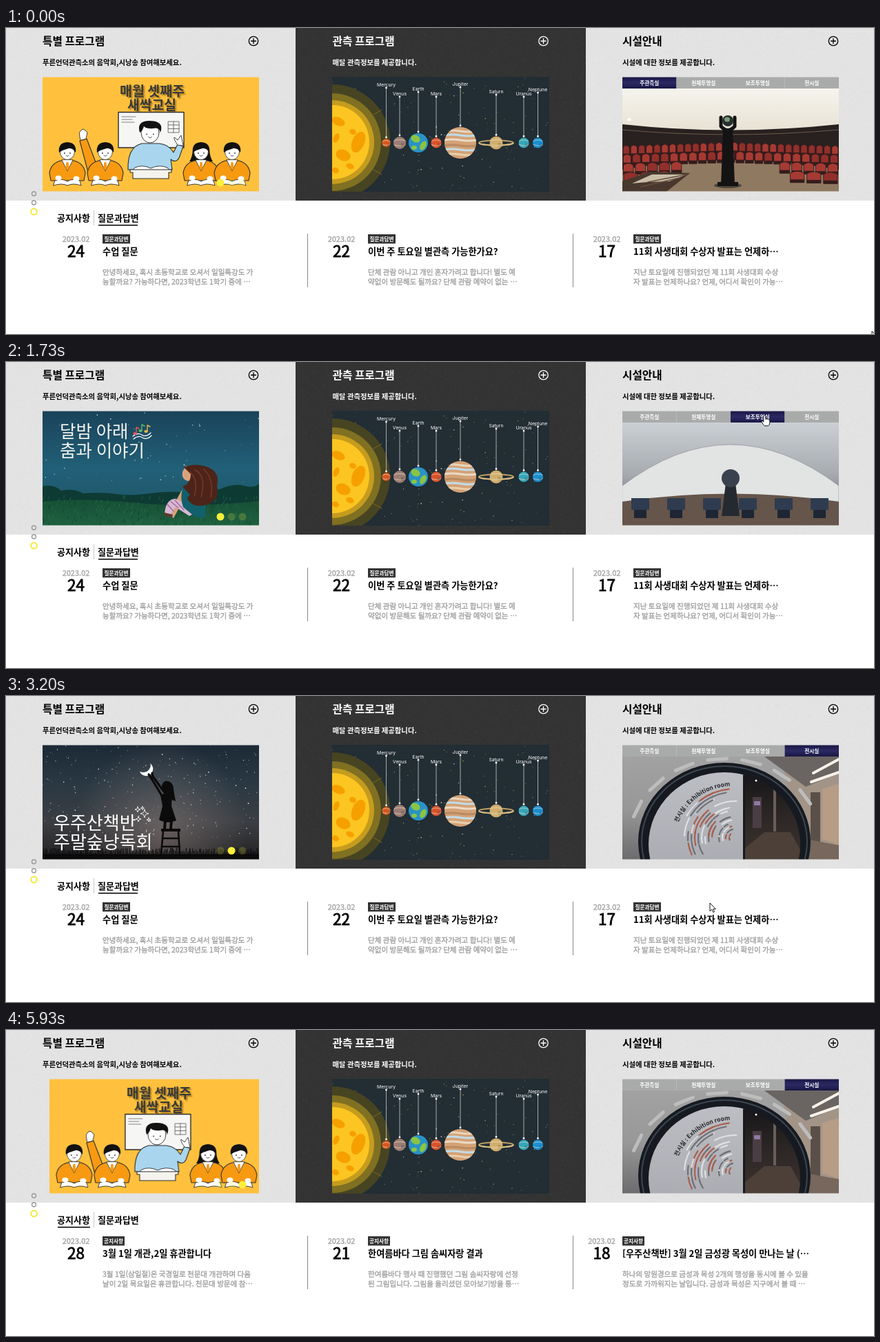
Recreate the animation shown at these times as an HTML page with a canvas. Size 1259 by 445 pixels, loop 5990 ms.

```html
<!DOCTYPE html>
<html lang="ko">
<head>
<meta charset="utf-8">
<title>천문대 안내</title>
<style>
html, body { margin: 0; width: 100%; height: 100%; overflow: hidden; background: #fff; }
canvas { display: block; }
</style>
</head>
<body>
<canvas id="stage" width="1259" height="445"></canvas>
<script>
const LOOP = 5990, TICK = 1000 / 15;
const SANS = '"Noto Sans CJK KR", "Noto Sans CJK JP", "Noto Sans", sans-serif';
const stage = document.getElementById('stage').getContext('2d');
let g = stage;

// Drawing helpers
function rect(c, x, y, w, h) { g.fillStyle = c; g.fillRect(x, y, w, h); }
function disc(c, x, y, rx, ry = rx, turn = 0) {
  g.fillStyle = c; g.beginPath(); g.ellipse(x, y, rx, ry, turn, 0, 7); g.fill();
}
function ring(c, w, x, y, rx, ry = rx, a = 0, b = 7) {
  g.strokeStyle = c; g.lineWidth = w;
  g.beginPath(); g.ellipse(x, y, rx, ry, 0, a, b); g.stroke();
}
function shape(d, fill, stroke, w = 1) {
  const p = new Path2D(d);
  if (fill) { g.fillStyle = fill; g.fill(p); }
  if (stroke) { g.strokeStyle = stroke; g.lineWidth = w; g.stroke(p); }
}
// A thin outline thickens weight 500, which may have no face of its own
function text(s, x, y, size, weight, color, align = 'left', family = SANS) {
  g.font = `${weight} ${size}px ${family}`;
  g.fillStyle = g.strokeStyle = color; g.textAlign = align;
  g.fillText(s, x, y + size * 0.37);
  if (weight === 500) {
    g.lineWidth = size * 0.035;
    g.strokeText(s, x, y + size * 0.37);
  }
}
function fade(y0, y1, ...colors) {
  const f = g.createLinearGradient(0, y0, 0, y1);
  colors.forEach((c, i) => f.addColorStop(i / (colors.length - 1), c));
  return f;
}
function seeded(seed) {
  return () => (seed = (seed * 16807) % 2147483647) / 2147483647;
}
function at(x, y, draw) { g.save(); g.translate(x, y); draw(); g.restore(); }

// Paints once, in stage coordinates, into a picture of its own
function layer(x, y, w, h, draw) {
  const c = document.createElement('canvas');
  c.width = w; c.height = h;
  g = c.getContext('2d');
  g.translate(-x, -y);
  g.lineJoin = g.lineCap = 'round';
  draw();
  g = stage;
  return c;
}
function stars(seed, n, x, y, w, h, color) {
  const rnd = seeded(seed);
  for (let i = 0; i < n; i++) {
    g.globalAlpha = 0.3 + 0.7 * rnd();
    disc(color, x + w * rnd(), y + h * rnd(), 0.3 + 0.6 * rnd());
  }
  g.globalAlpha = 1;
}

// Left slides
const INK = '#2d2d2d';
function face(x, y, r) {
  disc(INK, x - r * 0.4, y + r * 0.2, 0.9);
  disc(INK, x + r * 0.4, y + r * 0.2, 0.9);
  ring(INK, 0.8, x, y + r * 0.45, r * 0.22, r * 0.18, 0.3, 2.8);
}
function pupil(x, girl) {
  at(x, 179, () => {
    if (girl) shape('M-12 -2Q-13 10 -17 15H17Q13 10 12 -2Z', '#111');
    shape('M-26 32Q-24 18 -10 14H10Q24 18 26 32L24 43H-24Z', '#f79a12', INK, 1.1);
    shape('M-8 13L0 29L8 13Z', '#fff', INK, 0.8);
    shape('M-1.5 16H1.5L2.5 24L0 28L-2.5 24Z', '#f79a12');
    disc('#fff', 0, 1, 10.5, 11.5);
    ring(INK, 0.8, 0, 1, 10.5, 11.5);
    shape('M-12 2Q-14 -12 0 -13Q14 -12 12 2Q8 -5 2 -4Q-6 -2 -12 2Z', '#111');
    face(0, 1, 10);
    shape('M-18 43Q-8 39 0 44Q8 39 18 43L20 50Q8 46 0 50Q-8 46 -20 50Z', '#fff', INK, 0.9);
    disc('#fff', -13, 39, 4.5, 3.5);
    disc('#fff', 13, 40, 4.5, 3.5);
  });
}
function classSlide() {
  rect('#ffc13d', 53, 71, 314, 167);
  g.shadowColor = 'rgba(70,50,0,.5)'; g.shadowOffsetX = g.shadowOffsetY = 2; g.shadowBlur = 2;
  text('매월 셋째주', 212, 92, 19.5, 700, '#383838', 'center');
  text('새싹교실', 211.5, 112, 19.3, 700, '#383838', 'center');
  g.shadowColor = 'transparent';
  shape('M163 122.5H258V174H163Z', '#f6f6f4', INK, 1.4);
  shape('M168 129H188M168 133H183M168 137H186', null, '#666', 0.8);
  shape('M235.5 136H251V152H235.5ZM243 136V152M235.5 141H251M235.5 146.5H251', null, '#555', 0.8);
  shape('M177 206Q176 173 197 168H222Q236 169 243 181L249 169L257 172L251 189Q246 197 239 191L241 206Z', '#a9d6ee', INK, 1.1);
  shape('M249 170Q243 162 244 159L249 163L254 156L257 171Z', '#fff', INK, 0.9);
  disc('#fff', 209, 152, 13, 15);
  ring(INK, 0.9, 209, 152, 13, 15);
  shape('M194 152Q189 135 208 135Q230 135 224 152Q222 144 214 146Q204 147 200 143Q198 150 194 152Z', '#111');
  face(209, 152, 12);
  shape('M187 203Q198 198 210 204Q222 198 234 203L237 207H184Z', '#fff', INK, 0.9);
  shape('M180 206H240V210H236V219H184V210H180Z', '#f5f3ee', INK, 1.1);
  shape('M121 217L107 164L117 161L130 195Z', '#f79a12', INK, 1.1);
  shape('M108 163Q105 151 108 150L111 147L114 148L118 152L116 161Z', '#fff', INK, 0.9);
  pupil(89); pupil(144); pupil(283, true); pupil(328);
}
function nightSlide() {
  rect(fade(71, 238, '#1a425a', '#216078', '#1e5361'), 53, 71, 314, 167);
  stars(9, 75, 53, 71, 314, 115, '#d8e6dc');
  shape('M53 181Q68 177 80 187Q98 183 112 191Q140 189 160 192T210 191T258 190T310 185Q330 176 345 180T367 177V238H53Z', '#0d3b34');
  shape('M53 203Q110 197 190 205T367 202V238H53Z', fade(200, 238, '#164f35', '#1f6140'));
  const rnd = seeded(44);
  for (let i = 0; i < 260; i++) {
    const x = 53 + 314 * rnd(), y = 198 + 40 * rnd();
    shape(`M${x} ${y}l1 -4`, null, i % 2 ? '#28704a' : '#123f30', 0.7);
  }
  text('달밤 아래', 78, 101, 25.5, 300, '#f4f4ee');
  text('춤과 이야기', 78, 129, 25.5, 300, '#f4f4ee');
  shape('M184 108Q191 102 197 106T210 103M185 112Q192 106 198 110T211 107', null, '#fff', 1.2);
  [['#e2575a', 187, 104], ['#63b961', 195, 100], ['#e7b94a', 203, 101]].forEach(([c, x, y]) => {
    disc(c, x, y, 2.6, 2);
    shape(`M${x + 2} ${y}V${y - 9}L${x + 6} ${y - 7}`, null, c, 1.4);
  });
  shape('M260 180Q246 197 239 224L243 227L255 205Z', '#d9a27b');
  shape('M246 199Q232 199 230 220L239 222L246 211L266 224L279 216Z', '#d7b8d2');
  shape('M234 207L243 217M239 203L250 212M245 201L258 215', null, '#a9679c', 1.5);
  shape('M261 176Q250 191 257 211L275 226H289L291 192Q283 174 261 176Z', '#12606b');
  shape('M230 219L242 222L241 226L228 223Z', '#5a3b33');
  disc('#d9a27b', 264, 163, 8.5, 10);
  disc('#d9a27b', 261, 154, 2, 3, 0.5);
  shape('M258 153Q274 146 293 153Q311 160 306 181Q311 199 293 207Q274 213 266 203Q260 199 267 193L256 181Q268 177 268 163Z', '#4d2419');
  shape('M274 157Q291 165 283 196M287 156Q302 170 297 196M267 160Q280 173 273 195', null, '#743a25', 1.5);
}
function moonSlide() {
  rect(fade(71, 238, '#1c2a36', '#2a3843', '#3b3e43', '#242224'), 53, 71, 314, 167);
  const glow = g.createRadialGradient(225, 195, 5, 225, 190, 125);
  glow.addColorStop(0, 'rgba(145,130,125,.5)');
  glow.addColorStop(1, 'rgba(145,130,125,0)');
  rect(glow, 53, 71, 314, 167);
  stars(23, 240, 53, 71, 314, 135, '#e6edf0');
  const black = '#0c0b0c';
  const rnd = seeded(17);
  rect(black, 53, 230, 314, 8);
  for (let x = 53; x < 367; x += 1.2) {
    shape(`M${x} 232l${2 * rnd() - 1} ${-3 - 8 * rnd()}`, null, black, 0.8);
  }
  shape('M209 98A10 10 0 1 1 194 110Q204 113 208 106Q211 102 209 98Z', '#fff');
  shape('M226 145L211 120M234 146L213 117M211 120L207 114M213 117L212 112', null, black, 3.2);
  disc(black, 233, 132, 7, 8.5);
  shape('M231 124Q243 123 243 136L246 153L234 148L228 134Z', black);
  shape('M224 144Q232 139 241 147L240 160L247 181Q234 187 222 180L227 160Z', black);
  shape('M231 180L230 193M240 181L239 194', null, black, 4);
  rect(black, 225, 193, 28, 4);
  shape('M228 196L225 230M250 196L252 230M227 207H251M226 219H252', null, black, 2.6);
  [[191, 165, 4], [201, 171, 6], [192, 179, 4], [207, 180, 3], [198, 163, 2.5]].forEach(([x, y, r]) => {
    const q = r / 4;
    shape(`M${x} ${y - r}L${x + q} ${y - q}L${x + r} ${y}L${x + q} ${y + q}L${x} ${y + r}L${x - q} ${y + q}L${x - r} ${y}L${x - q} ${y - q}Z`, null, '#fff', 0.8);
  });
  text('우주산책반', 69, 184, 26, 300, '#fff');
  text('주말숲낭독회', 69, 212, 26, 300, '#fff');
}

// Middle picture
function solarSystem() {
  rect('#222d34', 473, 71, 315, 167);
  stars(71, 170, 473, 71, 315, 167, '#8a8f45');
  stars(5, 28, 540, 71, 248, 167, '#fff');
  [['#474422', 84], ['#807022', 71], ['#c59c1e', 61], ['#fcc521', 54]].forEach(([c, r]) => disc(c, 473, 166, r));
  [[482, 136, 10, 6], [503, 151, 5, 4], [511, 166, 9, 16], [489, 185, 11, 8], [479, 160, 4, 7], [478, 207, 5, 4], [499, 201, 6, 4]]
    .forEach(([x, y, a, b]) => disc('#f6a000', x, y, a, b, 0.4));
  shape('M543 166H558M533 126L545 119M533 206L545 213', null, '#7b6a22', 1);
  const planets = [
    ['Mercury', 551.5, 82, 6, '#d6561f'], ['Venus', 571, 95, 9, '#9c7d74'],
    ['Earth', 598, 88, 14, '#2a92c7'], ['Mars', 624, 95, 7.5, '#d7522c'],
    ['Jupiter', 659, 81, 23, '#d4a276'], ['Saturn', 711, 92, 9.5, '#d0ae6e'],
    ['Uranus', 751, 95, 7.5, '#36a6b9'], ['Neptune', 771.5, 89, 7.5, '#198fd2']
  ];
  for (const [name, x, y, r, c] of planets) {
    text(name, x, y, 6.8, 400, '#fff', 'center', 'Inter, sans-serif');
    shape(`M${x} ${y + 6}V${165 - r}`, null, '#c9cdcf', 0.8);
    disc('#fff', x, y + 5, 1.4);
    disc('#fff', x, 165 - r, 1.4);
    if (name === 'Saturn') ring('#b59a62', 2, x, 167, 25, 3.5);
    disc(c, x, 167, r);
    g.save();
    g.beginPath(); g.arc(x, 167, r, 0, 7); g.clip();
    if (name === 'Earth') {
      disc('#8ac541', x - 4, 161, 7, 5, 0.5);
      disc('#8ac541', x + 7, 171, 4, 7, 0.5);
      disc('#8ac541', x - 6, 174, 4, 3);
    } else if (name === 'Jupiter') {
      [[150, '#ead5bb'], [156, '#bfdcea'], [163, '#eadac7'], [171, '#b98a62'], [177, '#c4dce6'], [184, '#e8cfad']]
        .forEach(([yy, k]) => shape(`M${x - 24} ${yy}q12 -2 24 0t24 0`, null, k, 3.2));
    } else {
      shape(`M${x - r} ${167 - r / 3}q${r} -3 ${2 * r} 0M${x - r} ${167 + r / 3}q${r} 3 ${2 * r} 0`, null, 'rgba(255,235,210,.4)', 1.6);
      disc('rgba(0,0,0,.18)', x + r * 0.5, 170, r * 0.3);
    }
    g.restore();
    if (name === 'Saturn') ring('#d8bd83', 2, x, 167, 25, 3.5, 0.2, 2.94);
  }
}

// Room pictures
function seatsRoom() {
  rect(fade(88, 152, '#f6f4ee', '#e7e1d2'), 894, 88, 314, 150);
  shape('M894 140Q1050 157 1208 140V210H894Z', '#292120');
  shape('M894 148Q1050 162 1208 148', null, '#6c5a4c', 1);
  shape('M894 238V206Q1050 178 1208 206V238Z', '#8f7961');
  const rnd = seeded(12);
  for (let row = 0; row < 4; row++) {
    const n = 28 - row * 5, w = 314 / n;
    for (let i = 0; i < n; i++) {
      const x = 894 + (i + 0.5) * w, side = Math.abs(x - 1048) / 157;
      if (row > 1 && side < 0.25 + row * 0.11) continue;
      const y = 172 + row * 13 + side * 5;
      shape(`M${x - w * 0.42} ${y + 10}V${y - 3}Q${x} ${y - 9} ${x + w * 0.42} ${y - 3}V${y + 10}Z`, rnd() > 0.5 ? '#a63a33' : '#912f2b', '#351b1a', 0.9);
      rect('#351d1b', x - w * 0.42, y + 6, w * 0.84, 5);
    }
  }
  shape('M894 223L933 209L992 211L958 238H894Z', '#49382d');
  shape('M908 226L937 213L987 213L962 223L931 224Z', '#c9bda8');
  shape('M931 224L987 213M921 231L976 218', null, '#65503e', 1.5);
  const dark = '#141314';
  disc('#51463b', 1047, 229, 20, 4);
  shape('M1040 148H1054L1057 228H1037Z', dark);
  rect(dark, 1032, 224, 30, 6);
  shape('M1037 130V143Q1047 154 1057 143V130', null, dark, 5);
  disc('#26302b', 1047, 135, 8, 8);
  disc('#7c9a7a', 1046, 133, 4, 3.5);
  disc('#fff', 904, 133, 3, 2);
}
function scopeRoom() {
  rect(fade(88, 210, '#ddd6ca', '#f0eeea', '#d5d3ce'), 894, 88, 314, 150);
  shape('M894 88H1208V104Q1052 82 894 112Z', '#c5bdb0');
  shape('M894 129Q1040 105 1208 134', null, '#bdb6aa', 1);
  shape('M894 205Q950 184 1045 181Q1150 180 1208 216V238H894Z', '#755c4e');
  for (let i = 0; i < 13; i++) shape(`M${1048 + (i - 6) * 15} 182L${1048 + (i - 6) * 46} 238`, null, '#876c5b', 0.7);
  [[958, 145], [1000, 140], [1041, 137], [1088, 135], [1129, 143]].forEach(([x, y], i) => {
    shape(`M${x - 9} ${y - 7}L${x + 9} ${y - 9}V${y + 8}L${x - 8} ${y + 9}Z`, '#232a35');
    disc(i % 2 ? '#5b87ad' : '#8b8b88', x, y, 5);
  });
  [[912, 184], [940, 178], [980, 166], [1018, 162], [1112, 168]].forEach(([x, y]) =>
    shape(`M${x - 10} ${y - 5}L${x + 10} ${y - 8}V${y + 6}L${x - 10} ${y + 9}Z`, '#f4f3f0', '#aaa69e', 0.8));
  disc('#b62f31', 1123, 156, 4, 5);
  rect('#3a3d40', 1121, 160, 3, 29);
  disc('#5e6f81', 1063, 222, 27, 13);
  disc('#8ca3b8', 1063, 216, 22, 9);
  shape('M1055 165H1075L1082 216Q1063 225 1046 216Z', '#7797b5');
  shape('M1045 157L1081 148L1087 170L1052 181Z', '#a8c3da');
  shape('M1059 109L1086 112L1077 168L1054 164Z', '#e9edf0', '#a9b0b5', 0.8);
  shape('M1060 122L1084 126L1081 145L1058 142Z', '#8badc9');
  disc('#1b1c20', 1072, 109, 14, 9, 0.1);
  rect('#40515f', 1052, 178, 15, 17);
  shape('M1147 238V195L1208 180M1147 207L1208 194M1147 219L1208 209M1160 193V238M1178 188V238M1196 184V238', null, '#777a7d', 2);
}
function domeRoom() {
  rect(fade(88, 238, '#cbd0d5', '#a7abb0', '#555a63'), 894, 88, 314, 150);
  shape('M894 180Q1050 60 1208 180V205H894Z', '#e2e3e3', '#9da2a8', 1);
  shape('M894 203Q1050 180 1208 203V238H894Z', '#66554a');
  for (let i = 0; i < 6; i++) {
    const x = 920 + i * 52;
    rect('#2f3c50', x - 13, 198, 26, 17);
    rect('#1e2634', x - 9, 215, 18, 12);
  }
  shape('M1044 176H1058L1064 224H1038Z', '#252a31');
  disc('#39424e', 1051, 169, 13);
}
function arcText(s, cx, cy, r, from, size) {
  g.font = `700 ${size}px ${SANS}`;
  g.textAlign = 'center'; g.fillStyle = '#26262a';
  let a = from;
  for (const ch of s) {
    const half = g.measureText(ch).width / r / 2;
    a += half;
    at(cx + r * Math.cos(a), cy + r * Math.sin(a), () => {
      g.rotate(a + Math.PI / 2);
      g.fillText(ch, 0, 0);
    });
    a += half;
  }
}
function exhibitRoom() {
  rect(fade(88, 238, '#a2a2a2', '#989898', '#6c6c6e'), 894, 88, 314, 150);
  shape('M1125 88H1208V238H1150Z', '#a39488');
  shape('M1100 88H1208V112L1160 132Z', '#6a6562');
  shape('M1171 112L1208 92M1168 125L1208 111', null, '#f7f2ea', 4);
  shape('M1167 140H1181V213H1167Z', '#5b4f49');
  shape('M1184 135L1208 128V216L1184 208Z', '#b79c86');
  shape('M1160 208L1208 217V238H1160Z', '#77675d');
  for (let i = 0; i < 7; i++) {
    const a = 3.45 + i * 0.36;
    shape(`M${1043 + 139 * Math.cos(a)} ${212 + 121 * Math.sin(a)}L${1043 + 139 * Math.cos(a + 0.2)} ${212 + 121 * Math.sin(a + 0.2)}`, null, '#bdbdbd', 5);
  }
  disc('#161a20', 1042, 212, 125, 115);
  ring('#3c4650', 2, 1042, 212, 120, 110);
  g.save();
  g.beginPath(); g.ellipse(1042, 216, 110, 105, 0, 0, 7); g.clip();
  rect(fade(110, 238, '#bcbec3', '#abadb3'), 925, 100, 146, 138);
  rect(fade(110, 238, '#171517', '#2c2726', '#3c322d'), 1070, 100, 90, 138);
  shape('M1071 222L1100 198H1138L1160 238H1071Z', '#4c4039');
  rect('#4a3d44', 1083, 147, 13, 45);
  rect('#6b5d59', 1113, 135, 4, 62);
  rect('#8f78a2', 1085, 153, 9, 6);
  [[1088, 123], [1106, 119], [1125, 130]].forEach(([x, y]) => disc('#fff', x, y, 1.5));
  const rnd = seeded(31);
  for (let r = 9; r < 80; r += 5) {
    for (let k = 0; k < 4; k++) {
      const a = 2.6 + rnd() * 1.7, c = rnd() > 0.73 ? '#a8604f' : rnd() > 0.5 ? '#6f7077' : '#dedfe2';
      ring(c, 2.2, 1058, 206, r, r * 0.9, a, a + 0.2 + rnd() * 0.4);
    }
  }
  rect('#18191d', 1069, 100, 3, 138);
  g.restore();
  arcText('전시실 : Exhibition room', 1053, 215, 84, 3.52, 8.5);
}

const slides = [nightSlide, moonSlide, classSlide].map(d => layer(53, 71, 314, 167, d));
const rooms = [seatsRoom, scopeRoom, domeRoom, exhibitRoom].map(d => layer(894, 88, 314, 150, d));
const planetPicture = layer(473, 71, 315, 167, solarSystem);

// Everything that stays
const page = layer(0, 0, 1259, 445, () => {
  rect('#fff', 0, 0, 1259, 445);
  rect('#e3e3e3', 0, 0, 1259, 251);
  rect('#333', 420, 0, 421, 251);
  const rnd = seeded(7);
  for (let i = 0; i < 26000; i++) {
    rect(i % 2 ? 'rgba(255,255,255,.025)' : 'rgba(0,0,0,.02)', Math.floor(1259 * rnd()), Math.floor(251 * rnd()), 2, 1);
  }
  [['특별 프로그램', '푸른언덕관측소의 음악회,시낭송 참여해보세요.', '#000'],
   ['관측 프로그램', '매달 관측정보를 제공합니다.', '#fff'],
   ['시설안내', '시설에 대한 정보를 제공합니다.', '#000']].forEach(([head, sub, c], i) => {
    const x = 53 + i * 420.5;
    text(head, x, 19, 15.7, 700, c);
    text(sub, x, 50.5, 10.35, 700, c);
    ring(c, 1.3, x + 306, 19, 6.7);
    shape(`M${x + 302.5} 19h7m-3.5 -3.5v7`, null, c, 1.3);
  });
  g.drawImage(planetPicture, 473, 71);
  ring('#999', 1.4, 40.5, 241, 3);
  ring('#999', 1.4, 40.5, 254, 3);
  ring('#f3e93a', 2, 40.5, 267, 4.4);
  rect('#c8c8c8', 127, 265, 1, 22);
  rect('#8a8a8a', 437, 299, 1, 78);
  rect('#8a8a8a', 822, 299, 1, 78);
});

const TABS = ['주관측실', '천체투영실', '보조투영실', '전시실'];
const BOARDS = [
  { name: '공지사항', x: 74, w: 47, badge: 32, cols: [140, 525, 894], days: [101.5, 486.5, 864], posts: [
    ['28', '3월 1일 개관,2일 휴관합니다', '3월 1일(삼일절)은 국경일로 천문대 개관하며 다음', '날이 2일 목요일은 휴관합니다. 천문대 방문에 참⋯'],
    ['21', '한여름바다 그림 솜씨자랑 결과', '한여름바다 행사 때 진행했던 그림 솜씨자랑에 선정', '된 그림입니다. 그림을 올리셨던 모아보기방을 통⋯'],
    ['18', '[우주산책반] 3월 2일 금성광 목성이 만나는 날 (⋯', '하나의 망원경으로 금성과 목성 2개의 행성을 동시에 볼 수 있을', '정도로 가까워지는 날입니다. 금성과 목성은 지구에서 볼 때 ⋯']] },
  { name: '질문과답변', x: 133, w: 57, badge: 40, cols: [140, 525, 910], days: [101.5, 486.5, 871.5], posts: [
    ['24', '수업 질문', '안녕하세요, 혹시 초등학교로 오셔서 일일특강도 가', '능할까요? 가능하다면, 2023학년도 1학기 중에 ⋯'],
    ['22', '이번 주 토요일 별관측 가능한가요?', '단체 관람 아니고 개인 혼자가려고 합니다! 별도 예', '약없이 방문해도 될까요? 단체 관람 예약이 없는 ⋯'],
    ['17', '11회 사생대회 수상자 발표는 언제하⋯', '지난 토요일에 진행되었던 제 11회 사생대회 수상', '자 발표는 언제하나요? 언제, 어디서 확인이 가능⋯']] }
];

// Pointer stops: time, x, y
const ROUTE = [
  [0, 1256, 441], [200, 1105, 250], [400, 900, 70], [467, 888, 60], [600, 897, 62],
  [867, 1020, 79], [1067, 1020, 79], [1133, 1027, 81], [1267, 1027, 81], [1600, 1095, 78],
  [1800, 1103, 77], [2133, 1159, 75], [2733, 1159, 75], [2933, 1112, 175], [3200, 1021, 301],
  [3533, 926, 352], [4000, 100, 281], [4267, 100, 281], [4400, 152, 281], [4533, 152, 281],
  [4600, 137, 281], [4867, 100, 282], [5133, 100, 282], [5400, 150, 460], [LOOP, 150, 460]
];
const ARROW = 'M0 0V12L2.8 9.4L4.8 13.6L6.6 12.8L4.7 8.8H8.4Z';
const HAND = 'M-1.5 1Q0 -1 1.5 1V6Q3 4.8 4 6Q5.4 5.4 6 6.8Q7.5 6.5 7.5 8V11Q7 15 5 15.5H0Q-2 14 -4.5 9.5Q-4.5 8 -3 8.3L-1.5 9.8Z';

function pointer(t) {
  const i = Math.max(1, ROUTE.findIndex(s => s[0] > t));
  const [t0, x0, y0] = ROUTE[i - 1], [t1, x1, y1] = ROUTE[i];
  const p = (t - t0) / (t1 - t0);
  return [x0 + (x1 - x0) * p, y0 + (y1 - y0) * p];
}

// The CSS "ease" curve, solved by bisection
function ease(x) {
  if (x <= 0 || x >= 1) return x <= 0 ? 0 : 1;
  const curve = (s, a, b) => 3 * (1 - s) * (1 - s) * s * a + 3 * (1 - s) * s * s * b + s * s * s;
  let lo = 0, hi = 1;
  for (let i = 0; i < 20; i++) {
    const mid = (lo + hi) / 2;
    if (curve(mid, 0.25, 0.25) < x) lo = mid; else hi = mid;
  }
  return curve(lo, 0.1, 1);
}

const SLIDE_STARTS = [0, 2849, 5698], SLIDE_STEP = 344;
function drawSlides(t) {
  const now = SLIDE_STARTS.filter(s => s <= t).length - 1;
  const p = ease((t - SLIDE_STARTS[now]) / 300);
  g.save();
  g.beginPath(); g.rect(53, 71.5, 314, 166); g.clip();
  if (p < 1) g.drawImage(slides[(now + 2) % 3], 53 - SLIDE_STEP * p, 71);
  g.drawImage(slides[now], 53 + SLIDE_STEP * (1 - p), 71);
  g.restore();
  for (let i = 0; i < 3; i++) {
    disc(i === now ? '#fbf03a' : 'rgba(251,240,58,.2)', 311 + i * 16, 225, 5.5);
  }
}
function drawRooms(t) {
  const now = [1060, 1730, 2395].filter(s => s <= t).length;
  g.drawImage(rooms[now], 894, 88);
  rect('#e3e3e3', 894, 237.5, 314, 1);
  TABS.forEach((name, i) => {
    const x = 894 + i * 78.5;
    rect(i === now ? fade(71, 88, '#191744', '#2b2963', '#191744') : '#a9abaa', x, 71.5, 78.5, 16.5);
    text(name, x + 39.25, 80, 7.65, 700, '#fff', 'center');
  });
}
function drawBoard(t, px, py) {
  const now = t < 5060 ? 1 : 0, b = BOARDS[now];
  BOARDS.forEach(({ name, x, w }) => {
    const over = py > 262 && py < 290 && px >= x && px <= x + w;
    text(name, x, 276, 13, over ? 500 : 700, over ? '#333' : '#000');
  });
  rect('#000', b.x + 1, 286, b.w, 1.5);
  b.posts.forEach(([day, title, l1, l2], i) => {
    const x = b.cols[i];
    text('2023.02', b.days[i], 307, 11, 500, '#a5a5a5', 'center');
    text(day, b.days[i], 325, 22.5, 500, '#000', 'center');
    rect('#333', x, 300, b.badge, 13.5);
    text(b.name, x + b.badge / 2, 307, 7.65, 700, '#fff', 'center');
    text(title, x, 325, 13.2, 700, '#000');
    text(l1, x, 355.5, 10.55, 500, '#a0a0a0');
    text(l2, x, 369, 10.55, 500, '#a0a0a0');
  });
}
function drawPointer(x, y) {
  const onTab = y > 71 && y < 88 && x > 894 && x < 1208;
  const onBoard = y > 262 && y < 290 && x > 74 && x < 192;
  at(x, y, () => shape(onTab || onBoard ? HAND : ARROW, '#fff', '#000', 0.9));
}

function frame(ms) {
  const t = Math.floor((ms % LOOP + 4) / TICK) * TICK % LOOP;
  const [px, py] = pointer(t);
  g.drawImage(page, 0, 0);
  drawSlides(t);
  drawRooms(t);
  drawBoard(t, px, py);
  drawPointer(px, py);
}
const start = performance.now();
function run() {
  frame(performance.now() - start);
  requestAnimationFrame(run);
}
run();
</script>
</body>
</html>
```
